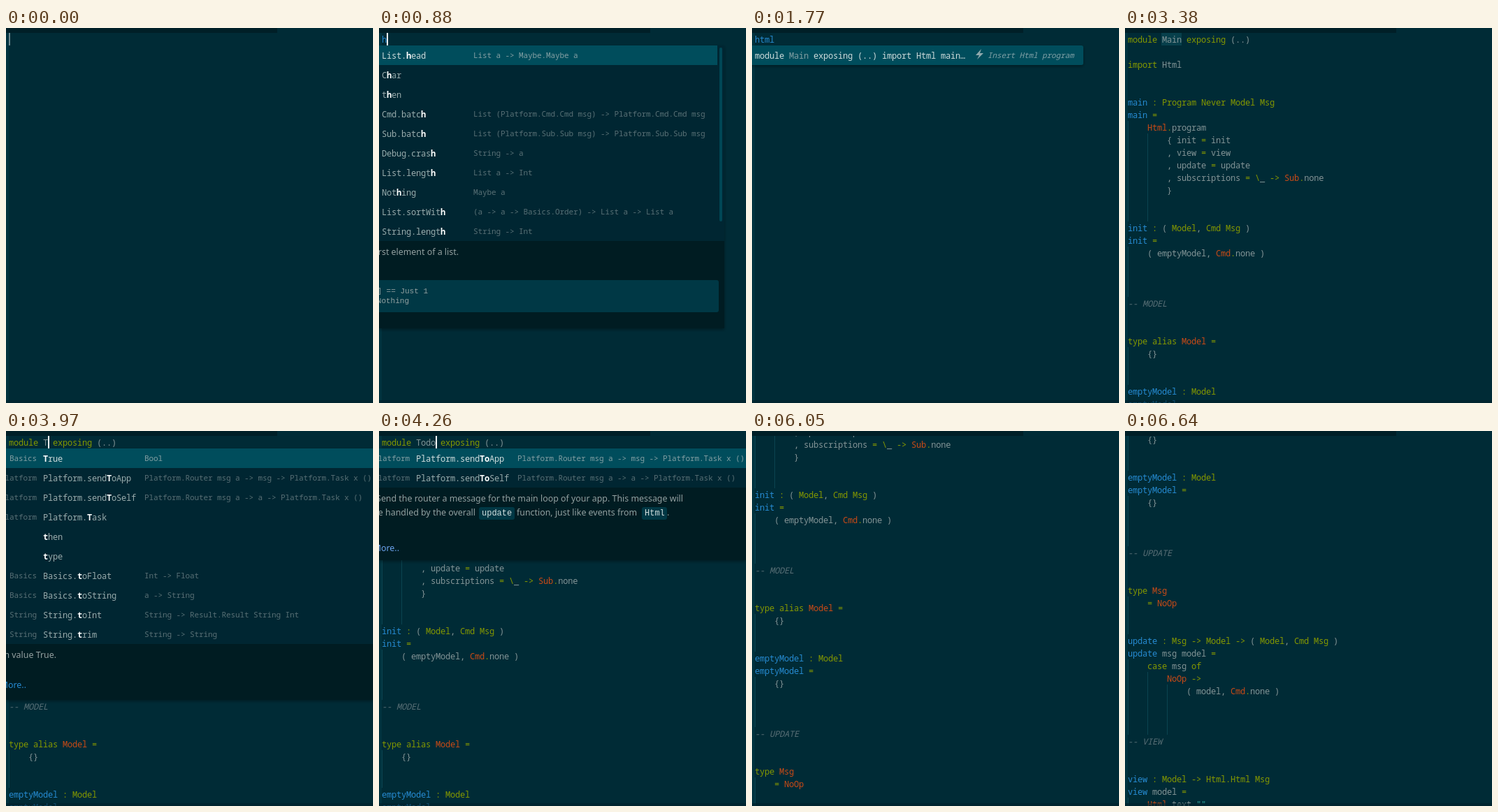
Animation of 525 by 537 pixels, one loop 7.83 s. Source, as an HTML page:

```html
<!DOCTYPE html>
<html lang="en">
<head>
<meta charset="utf-8">
<title>Elm autocomplete</title>
<style>
html, body { margin: 0; width: 100%; height: 100%; overflow: hidden; background: #002b36; }
svg { display: block; width: 525px; height: 537px; }
text { white-space: pre; }
.code { font: 12px "Noto Sans Mono", "DejaVu Sans Mono", monospace; letter-spacing: -.2px; fill: #839496; }
.hint { font: 11px "Noto Sans Mono", "DejaVu Sans Mono", monospace; letter-spacing: -.1px; fill: #586e75; }
.doc { font: 12.4px "Noto Sans", "Open Sans", sans-serif; fill: #93a1a1; }
.mono { font: 11px "Liberation Mono", monospace; fill: #93a1a1; }
.chip { font: 12px "Liberation Mono", monospace; fill: #d5e0e0; }
.item { fill: #9aabad; }
.lit { fill: #cfdcdc; }
.b { fill: #268bd2; }
.g { fill: #859900; }
.o { fill: #cb4b16; }
.s { fill: #2aa198; }
.c { fill: #586e75; font-style: italic; }
.w { fill: #fff; font-weight: bold; }
.dim { fill: #839fa3; }
.end { text-anchor: end; }
.it { font-style: italic; fill: #7fa0a6; }
</style>
</head>
<body>
<svg viewBox="0 0 525 537">
  <defs>
    <filter id="shadow" x="-5%" y="-10%" width="110%" height="130%">
      <feDropShadow dx="0" dy="2" stdDeviation="2" flood-color="#000" flood-opacity=".35"/>
    </filter>
  </defs>
  <rect width="525" height="537" fill="#002b36"/>
  <rect y="7" width="4" height="530" fill="#01333f"/>
  <g id="page"></g>
  <rect id="field" x="52" y="7" width="29" height="18" fill="#073f4b"/>
  <text id="first" class="code" x="4" y="21"></text>
  <rect id="cursor" y="7" width="2" height="18" fill="#fff"/>
  <rect y="533" width="525" height="4" fill="#00212a" opacity=".6"/>
  <g id="popups"></g>
  <rect width="525" height="7" fill="#002b36"/>
  <rect width="388" height="7" fill="#001f27"/>
</svg>
<script>
const LOOP = 7830, STEP = 147.3, ROW = 18, CH = 7;
const $ = id => document.getElementById(id);
const esc = s => s.replace(/&/g, "&amp;").replace(/</g, "&lt;").replace(/>/g, "&gt;");

// "~bmain~ = x" colours "main" with class b
const paint = s => s.split("~").map((p, i) =>
  i % 2 ? `<tspan class="${p[0]}">${esc(p.slice(1))}</tspan>` : esc(p)).join("");
const text = (x, y, cls, s) => `<text x="${x}" y="${y}" class="${cls}">${paint(s)}</text>`;
const box = (x, y, w, h, fill, r = 0) =>
  `<rect x="${x}" y="${y}" width="${w}" height="${h}" fill="${fill}" rx="${r}"/>`;

// Each entry: line number, source text
const lines = [
  [2, "~gimport~ Html"],
  [5, "~bmain~ ~g: Program Never Model Msg~"],
  [6, "~bmain~ ~g=~"],
  [7, "    ~oHtml~~g.~program"],
  [8, "        { init ~g=~ init"],
  [9, "        , view ~g=~ view"],
  [10, "        , update ~g=~ update"],
  [11, "        , subscriptions ~g=~ ~g\\~_ ~g->~ ~oSub~~g.~none"],
  [12, "        }"],
  [15, "~binit~ ~g:~ ( ~gModel~, ~gCmd Msg~ )"],
  [16, "~binit~ ~g=~"],
  [17, "    ( emptyModel, ~oCmd~~g.~none )"],
  [21, "~c-- MODEL~"],
  [24, "~gtype alias~ ~oModel~ ~g=~"],
  [25, "    {}"],
  [28, "~bemptyModel~ ~g: Model~"],
  [29, "~bemptyModel~ ~g=~"],
  [30, "    {}"],
  [34, "~c-- UPDATE~"],
  [37, "~gtype~ ~oMsg~"],
  [38, "    ~g=~ ~oNoOp~"],
  [41, "~bupdate~ ~g: Msg -> Model ->~ ( ~gModel~, ~gCmd Msg~ )"],
  [42, "~bupdate~ msg model ~g=~"],
  [43, "    ~gcase~ msg ~gof~"],
  [44, "        ~oNoOp~ ~g->~"],
  [45, "            ( model, ~oCmd~~g.~none )"],
  [49, "~c-- VIEW~"],
  [52, "~bview~ ~g: Model -> Html.Html Msg~"],
  [53, "~bview~ model ~g=~"],
  [54, "    ~oHtml~~g.~text ~s\"\"~"]
];
// Indent guides: level, first line, line after the last
const guides = [
  [0, 7, 15], [1, 8, 15], [0, 17, 21], [0, 25, 28], [0, 30, 34], [0, 38, 41],
  [0, 43, 49], [1, 44, 49], [2, 45, 49], [0, 54, 57]
];
$("page").innerHTML =
  guides.map(([l, a, b]) => box(4 + 28 * l, 7 + ROW * a, 1, ROW * (b - a), "#0b4450")).join("") +
  lines.map(([n, s]) => text(4, 21 + ROW * n, "code", s)).join("");

// Suggestion rows; each item: label, type, optional module
function rows(items, x, hintX, w) {
  return box(0, 25, w, 28 * items.length, "#002832") + box(0, 25, w, 28, "#004d5c") +
    items.map(([label, type, mod], i) => {
      const y = 44 + 28 * i, sel = i ? "" : " dim";
      return (mod ? text(44, y - 1, "hint end" + sel, mod) : "") +
        text(x, y, "code " + (i ? "item" : "lit"), label) +
        text(hintX, y - 1, "hint" + sel, type);
    }).join("");
}

const forH = [
  ["List.~whead~".replace("~whead~", "~wh~ead"), "List a -> Maybe.Maybe a"],
  ["C~wh~ar", ""],
  ["t~wh~en", ""],
  ["Cmd.batc~wh~", "List (Platform.Cmd.Cmd msg) -> Platform.Cmd.Cmd msg"],
  ["Sub.batc~wh~", "List (Platform.Sub.Sub msg) -> Platform.Sub.Sub msg"],
  ["Debug.cras~wh~", "String -> a"],
  ["List.lengt~wh~", "List a -> Int"],
  ["Not~wh~ing", "Maybe a"],
  ["List.sortWit~wh~", "(a -> a -> Basics.Order) -> List a -> List a"],
  ["String.lengt~wh~", "String -> Int"]
];
const send = (bold, rest, arg) => ["Platform.send~w" + bold + "~" + rest,
  `Platform.Router msg a -> ${arg} -> Platform.Task x ()`, "Platform"];
const forT = [
  ["~wT~rue", "Bool", "Basics"],
  send("T", "oApp", "msg"),
  send("T", "oSelf", "a"),
  ["Platform.~wT~ask", "", "Platform"],
  ["~wt~hen", ""],
  ["~wt~ype", ""],
  ["Basics.~wt~oFloat", "Int -> Float", "Basics"],
  ["Basics.~wt~oString", "a -> String", "Basics"],
  ["String.~wt~oInt", "String -> Result.Result String Int", "String"],
  ["String.~wt~rim", "String -> String", "String"]
];

const panel = "#001b21", chipBg = "#003845";
const popups = {
  h: box(0, 25, 494, 280, "#002832") + box(0, 305, 494, 125, panel) +
    rows(forH, 4, 135, 484) + box(487, 28, 4, 249, "#004655", 2) +
    text(114, 325, "doc end", "Extract the first element of a list.") +
    box(-10, 361, 496, 46, chipBg, 3) +
    text(70, 380, "mono end", "head [1,2,3] == Just 1") +
    text(43, 394, "mono end", "head [] == Nothing"),
  html: box(-5, 25, 479, 28, "#004d5c", 3) +
    text(4, 44, "code lit", "module ~dMain~ exposing (..) import Html main…").replace('class="d"', 'class="dim"') +
    '<path d="M328 30L320 39H325L322 45L331 36H326Z" fill="#8fa9ad"/>' +
    text(337, 43, "hint it", "Insert Html program"),
  t: rows(forT, 53, 198, 525) + box(0, 305, 525, 80, panel) +
    text(72, 325, "doc end", "The boolean value True.") +
    text(29, 368, "doc end b", "More.."),
  to: rows([send("To", "App", "msg"), send("To", "Self", "a")], 53, 198, 525) +
    box(0, 81, 525, 104, panel) +
    text(435, 101, "doc end", "Send the router a message for the main loop of your app. This message will") +
    text(138, 121, "doc end", "be handled by the overall") +
    box(143, 109, 51, 18, chipBg, 3) + text(147, 121, "chip", "update") +
    text(197, 121, "doc", "function, just like events from") +
    box(376, 109, 36, 18, chipBg, 3) + text(380, 121, "chip", "Html") +
    text(412, 121, "doc", ".") +
    text(29, 172, "doc end", "More..").replace("<text", '<text style="fill:#6ba4ee"')
};
$("popups").innerHTML = Object.entries(popups).map(([k, s]) =>
  `<g id="pop-${k}" filter="url(#shadow)">${s}</g>`).join("");

// Start time, typed text, open popup, whether the program is inserted, blink start
const scenes = [
  [0, "", "", false, -235],
  [880, "h", "h", false, LOOP],
  [1030, "htm", "h", false, LOOP],
  [1180, "html", "html", false, 1330],
  [2800, "Main", "", true, 2950],
  [3970, "T", "t", true, LOOP],
  [4120, "To", "to", true, LOOP],
  [4260, "Todo", "to", true, LOOP],
  [4560, "Todo", "", true, 4335]
];

const show = (el, on) => el.setAttribute("display", on ? "inline" : "none");

function blink(t, from) {
  const now = Math.floor((t + 12) / STEP) * STEP;
  return .5 + .5 * Math.cos(2 * Math.PI * Math.max(0, now - from) / 880);
}

function scrollAt(t) {
  if (t < 5600) return 0;
  const n = t < 5896 ? 1 : Math.min(7, 2 + Math.floor((t - 5896) / 148));
  return Math.round(454 * n / 7);
}

function draw(t) {
  const [start, typed, popup, inserted, from] = scenes.filter(s => s[0] <= t).pop();
  const top = scrollAt(t);
  const shift = `translate(0 ${-top})`;
  show($("page"), inserted);
  show($("field"), start === 2800);
  for (const k in popups) show($("pop-" + k), k === popup);
  $("first").innerHTML = paint(inserted ? `~gmodule~ ${typed} ~gexposing~ (..)` : `~b${typed}~`);
  const col = typed.length + (inserted ? 7 : 0);
  $("cursor").setAttribute("x", 4 + CH * col);
  const held = start === 1180 ? Math.min(t, 2500) : t;
  $("cursor").setAttribute("opacity", blink(held, from).toFixed(3));
  for (const id of ["page", "first", "cursor"]) $(id).setAttribute("transform", shift);
}

function tick() {
  draw(performance.now() % LOOP);
  requestAnimationFrame(tick);
}
tick();
</script>
</body>
</html>
```
